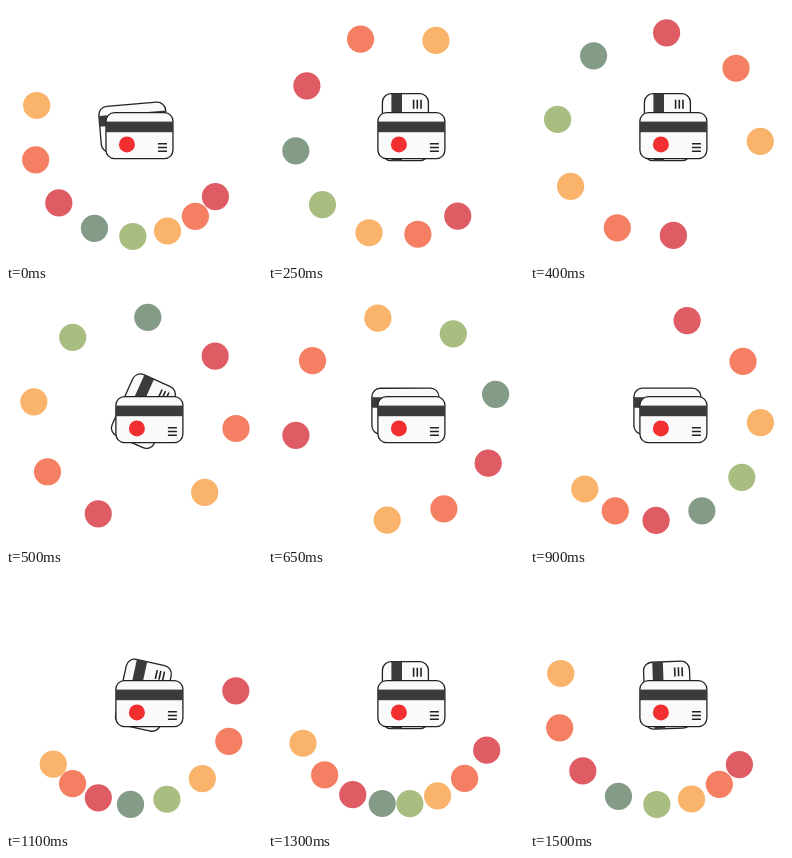
These frames come from a looping animation (256 px wide and 256 px high, 1550 ms). An HTML page:

```html
<!DOCTYPE html>
<html lang="en">
<head>
<meta charset="utf-8">
<title>Card loader</title>
<style>
  html, body { margin: 0; width: 100%; height: 100%; overflow: hidden; background: #fff; }
  svg { display: block; width: 100vw; height: 100vh; }
  .face { fill: #fafafa; stroke: #222; stroke-width: 1.3; }
  .stripe { fill: #3a3c39; }
  .lines { stroke: #222; stroke-width: 1.6; }
</style>
</head>
<body>
<svg viewBox="0 0 256 256">
  <defs>
    <g id="card">
      <rect class="face" x="-33.5" y="-23" width="67" height="46" rx="8.5"/>
      <rect class="stripe" x="-33.5" y="-14" width="67" height="10.6"/>
      <path class="lines" d="M18.5 8.2h9M18.5 11.9h9M18.5 15.6h9"/>
    </g>
  </defs>
  <g id="dots"></g>
  <g id="cards">
    <g id="back"><use href="#card"/></g>
    <g transform="translate(143.4 129.6)">
      <use href="#card"/>
      <circle cx="-12.5" cy="8.8" r="8" fill="#f22f30"/>
    </g>
  </g>
</svg>
<script>
const LOOP = 1550, STEP = 50, TURN = 1500, LAG = 62.5;
const COLORS = ['#e05c65', '#f47f62', '#fab36a', '#a9bd80', '#849b87'];
const byId = id => document.getElementById(id);

// cubic-bezier(.5, 0, .5, 1)
function ease(p) {
  if (p <= 0) return 0;
  if (p >= 1) return 1;
  let lo = 0, hi = 1, s = 0.5;
  for (let i = 0; i < 24; i++) {
    s = (lo + hi) / 2;
    if (1.5 * s * (1 - s) + s * s * s < p) lo = s; else hi = s;
  }
  return s * s * (3 - 2 * s);
}

const span = (t, from, length) => ease((t - from) / length);

const dots = Array.from({ length: 8 }, (_, i) => {
  const dot = document.createElementNS('http://www.w3.org/2000/svg', 'circle');
  dot.setAttribute('r', 13.6);
  dot.setAttribute('fill', COLORS[i % COLORS.length]);
  return byId('dots').appendChild(dot);
});

function draw(t) {
  dots.forEach((dot, i) => {
    const turn = ease(((t + i * LAG) % TURN) / TURN);
    const a = (127.5 + 15 * i + 360 * turn) * Math.PI / 180;
    dot.setAttribute('cx', 128.5 + 102 * Math.sin(a));
    dot.setAttribute('cy', 128.5 - 102 * Math.cos(a));
  });

  const tip = span(t, -46, 250);
  const tilt = -90 * (tip - span(t, 406, 250) + span(t, 920, 250)) - 2 * span(t, 1400, 100);
  byId('back').setAttribute('transform', `translate(137.4 121.2) rotate(${tilt})`);
  byId('cards').setAttribute('transform', `translate(${-10.5 * (1 - tip)} 0)`);
}

// The picture advances 20 times a second.
const start = performance.now();
function tick() {
  const t = (performance.now() - start) % LOOP;
  draw(Math.floor(t / STEP) * STEP);
  requestAnimationFrame(tick);
}
draw(0);
requestAnimationFrame(tick);
</script>
</body>
</html>
```
